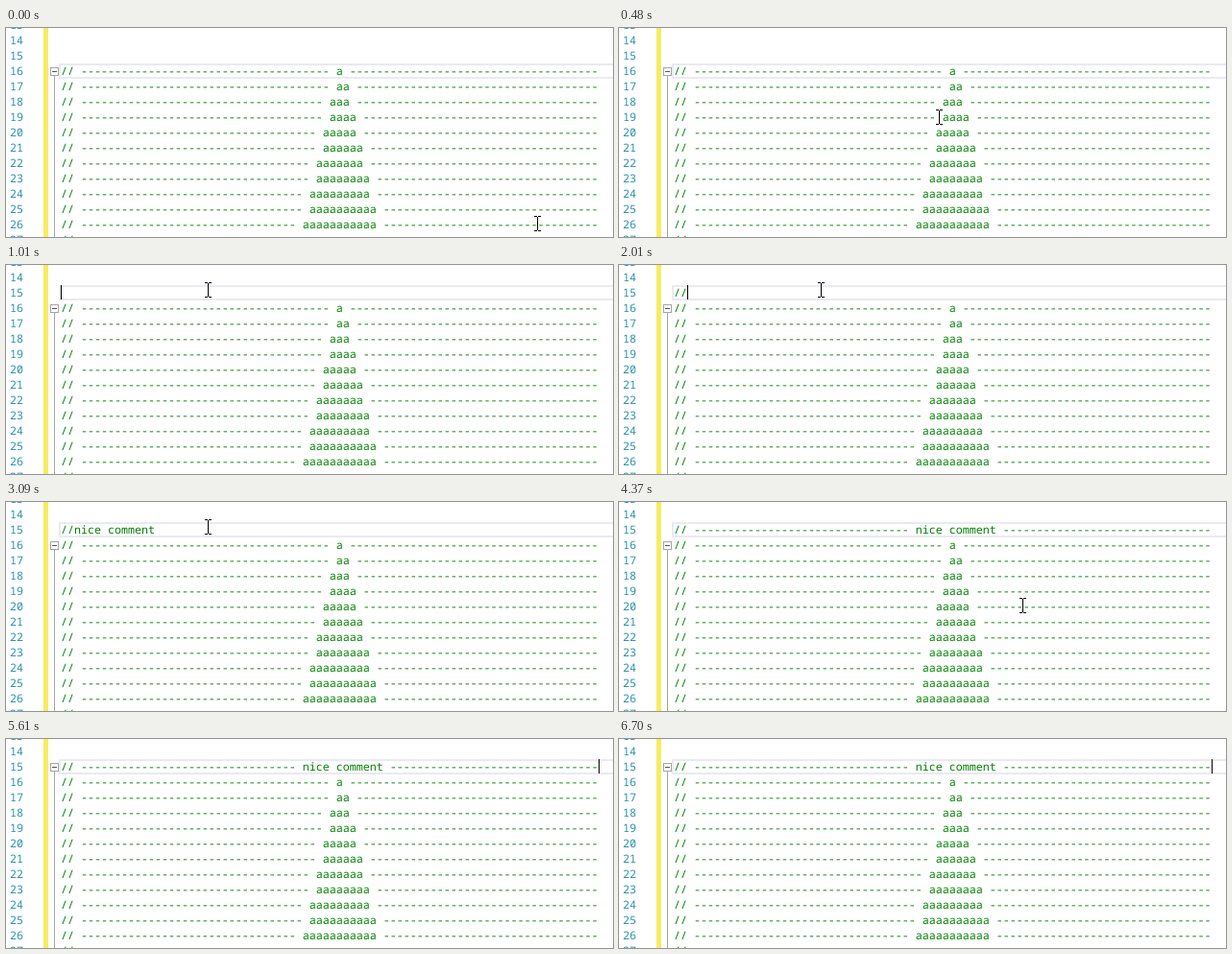
Animation of 632 by 218 pixels, one loop 6.84 s. Source, as an HTML page:

```html
<!DOCTYPE html>
<html lang="en">
<head>
<meta charset="utf-8">
<title>Centered comment</title>
<style>
  html, body { margin: 0; width: 632px; height: 218px; overflow: hidden; background: #fff; }
  svg { display: block; }
  text {
    font: 11.667px "Noto Sans Mono", "DejaVu Sans Mono", monospace;
    font-variant-ligatures: none;
    text-rendering: geometricPrecision;
  }
  .code { fill: #008000; }
  .number { fill: #2b91af; }
</style>
</head>
<body>
<svg id="stage" width="632" height="218" viewBox="0 0 632 218">
  <rect width="632" height="218" fill="#fff"/>
  <rect x="39" width="5" height="218" fill="#f8eb62"/>
  <rect id="current" x="56" y="38" width="600" height="14" fill="none" stroke="#eaeaf2" stroke-width="2"/>
  <g id="fold" fill="none" stroke="#a5a5a5">
    <path d="M50.5 50V240"/>
    <rect x="46.5" y="41.5" width="8" height="8" fill="#fff"/>
    <path d="M48 45.5h5" stroke="#555"/>
  </g>
  <g id="lines"></g>
  <rect id="caret" y="21" width="1" height="15"/>
  <circle id="click" cx="208" cy="25" r="12" fill="#ffff70"/>
  <path id="pointer" d="M0 .5h3m1 0h3M3.5 1v14M0 15.5h3m1 0h3" fill="none" stroke="#000"/>
</svg>
<script>
const LOOP = 6840, CHAR = 7, LINE = 16, LEFT = 57, COLUMNS = 80;
const NOTE = "nice comment";
const el = id => document.getElementById(id);
const baseline = line => 33 + (line - 15) * LINE;

function centered(word) {
  const dashes = COLUMNS - 5 - word.length;
  const left = Math.ceil(dashes / 2);
  return `// ${"-".repeat(left)} ${word} ${"-".repeat(dashes - left)}`;
}

function addText(x, line, kind, content) {
  const node = document.createElementNS("http://www.w3.org/2000/svg", "text");
  node.setAttribute("x", x);
  node.setAttribute("y", baseline(line));
  node.setAttribute("class", kind);
  node.textContent = content;
  el("lines").append(node);
  return node;
}

for (let line = 13; line <= 27; line++) {
  addText(4, line, "number", line);
  if (line > 15) addText(LEFT, line, "code", centered("a".repeat(line - 15)));
}
const typed = addText(LEFT, 15, "code", "");

// Caret states: [start time, visible]
const blinks = [[0, 0], [1010, 1], [1480, 0], [2010, 1], [3090, 0], [3490, 1], [3970, 0],
  [4520, 1], [5080, 0], [5610, 1], [6160, 0], [6700, 1]];
const contents = [[0, ""], [2010, "//"], [2560, "//" + NOTE], [3490, centered(NOTE)]];
const clickFade = [[0, 0], [820, 0.5], [870, 1], [1010, 0]];
const exitTicks = [4240, 4300, 4370, 4450, 4520, 4590, 4660, 4730, 4800, 4870];

const at = (states, t) => states.findLast(([start]) => start <= t)[1];
const mix = (a, b, u) => a.map((v, i) => Math.round(v + (b[i] - v) * u));
const smooth = u => u * u * (3 - 2 * u);

function pointerAt(t) {
  const start = [550, 196], near = [210, 24], rest = [207, 18], middle = [417, 100], exit = [599, 210];
  if (t < 760) {
    const step = Math.min(10, Math.max(0, Math.floor((t - 70) / 68.9 + 0.01) + 1));
    return mix(start, near, smooth(step / 10));
  }
  const now = exitTicks.findLast(tick => tick <= t);
  if (!now) return rest;
  if (now <= 4370) return mix(rest, middle, ((now - 4170) / 200) ** 1.2);
  return mix(middle, exit, 1 - ((4870 - now) / 500) ** 1.7);
}

function draw(t) {
  const content = at(contents, t);
  if (typed.textContent !== content) typed.textContent = content;
  el("caret").setAttribute("x", LEFT + content.length * CHAR);
  el("caret").setAttribute("opacity", at(blinks, t));
  el("current").setAttribute("y", t < 1010 ? 38 : 22);
  el("fold").setAttribute("transform", `translate(0 ${t < 5220 ? 0 : -LINE})`);
  el("click").setAttribute("opacity", at(clickFade, t));
  el("pointer").setAttribute("transform", `translate(${pointerAt(t)})`);
  el("pointer").setAttribute("opacity", t < 4940 ? 1 : 0);
}

const began = performance.now();
function tick() {
  draw((performance.now() - began) % LOOP);
  requestAnimationFrame(tick);
}
tick();
</script>
</body>
</html>
```
